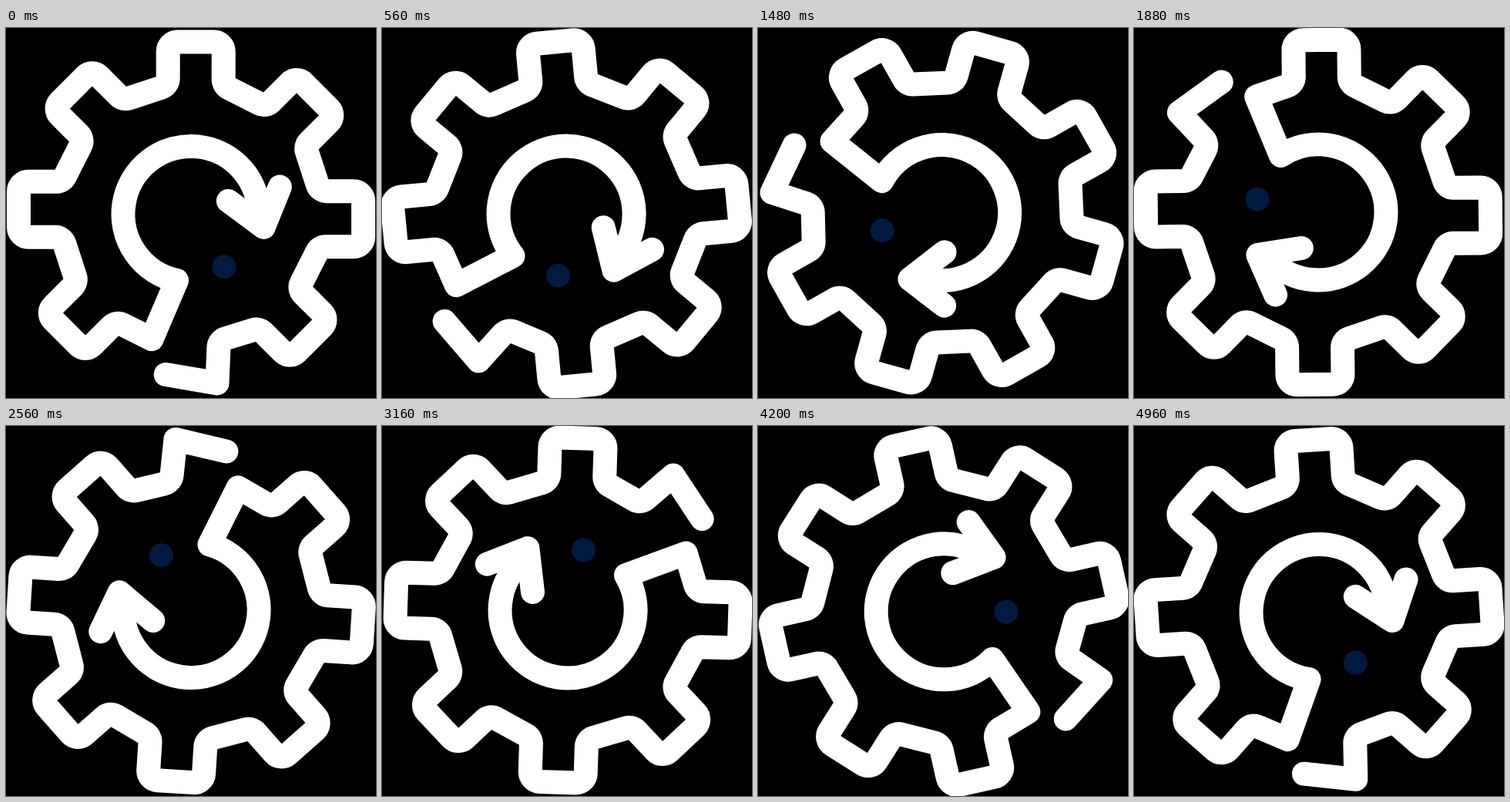
These frames come from a looping animation (480x480 px, 5 s). An HTML page:

```html
<!DOCTYPE html>
<html lang="en">
<head>
<meta charset="utf-8">
<title>Rotating gear</title>
<style>
  html, body { margin: 0; width: 100%; height: 100%; overflow: hidden; background: #000; }
  svg { display: block; width: 100vw; height: 100vh; }
</style>
</head>
<body>
<svg viewBox="0 0 480 480">
  <g id="gear">
    <g fill="none" stroke="#fff" stroke-width="31" stroke-linecap="round" stroke-linejoin="round">
      <path id="outline"/>
      <path d="M48.4 -17.1L94.2 16.9L115.3 -35.4"/>
    </g>
    <circle cx="43" cy="68.3" r="15.5" fill="#001a40"/>
  </g>
</svg>
<script>
const LOOP = 5000, STEP = 40;
const FPS = 60;                  // rotation advances in whole ticks of this rate
const TIP = 223.5, BASE = 167, HALF = 36;
const SHIFT = 6.2;               // sideways offset of every tooth from its axis
const RING = 88, ROUND = 12.5;

const gear = document.getElementById('gear');
const fmt = (x, y) => x.toFixed(2) + ' ' + y.toFixed(2);

// The four corners of a tooth whose axis points along deg.
function tooth(deg) {
  const a = deg * Math.PI / 180, c = Math.cos(a), s = Math.sin(a);
  const lo = SHIFT - HALF, hi = SHIFT + HALF;
  return [[BASE, lo], [TIP, lo], [TIP, hi], [BASE, hi]]
    .map(([t, w]) => ({ x: t * c - w * s, y: t * s + w * c, r: ROUND }));
}

// Polyline with each corner replaced by an arc of its radius r.
function rounded(pts) {
  let d = '';
  pts.forEach((p, i) => {
    const a = pts[i - 1], b = pts[i + 1];
    if (!p.r || !a || !b) { d += 'L' + fmt(p.x, p.y); return; }
    const la = Math.hypot(a.x - p.x, a.y - p.y), lb = Math.hypot(b.x - p.x, b.y - p.y);
    const ax = (a.x - p.x) / la, ay = (a.y - p.y) / la;
    const bx = (b.x - p.x) / lb, by = (b.y - p.y) / lb;
    const cut = p.r / Math.tan(Math.acos(ax * bx + ay * by) / 2);
    const sweep = ax * by - ay * bx < 0 ? 1 : 0;
    d += 'L' + fmt(p.x + ax * cut, p.y + ay * cut) +
      `A${p.r} ${p.r} 0 0 ${sweep} ` + fmt(p.x + bx * cut, p.y + by * cut);
  });
  return d;
}

const rim = [{ x: -18.5, y: 86 }, { x: -51, y: 162.2 }];
for (let k = 0; k < 7; k++) rim.push(...tooth(135 + 45 * k));
rim.push({ x: 36.3, y: 163.8, r: ROUND }, { x: 34, y: 219.4 }, { x: -32.8, y: 208 });

document.getElementById('outline').setAttribute('d',
  `M87.9 4A${RING} ${RING} 0 1 0 -18.5 86` + rounded(rim));

function draw(ms) {
  const t = Math.floor((ms % LOOP) / STEP) * STEP;
  const ticks = Math.floor(t * FPS / 1000);
  const angle = ticks * 360 / (FPS * LOOP / 1000);
  gear.setAttribute('transform', `rotate(${angle.toFixed(2)} 240 240) translate(240 241.5)`);
}

let start = null;
function tick(now) {
  if (start === null) start = now;
  draw(Math.max(0, now - start));
  requestAnimationFrame(tick);
}
draw(0);
requestAnimationFrame(tick);
</script>
</body>
</html>
```
